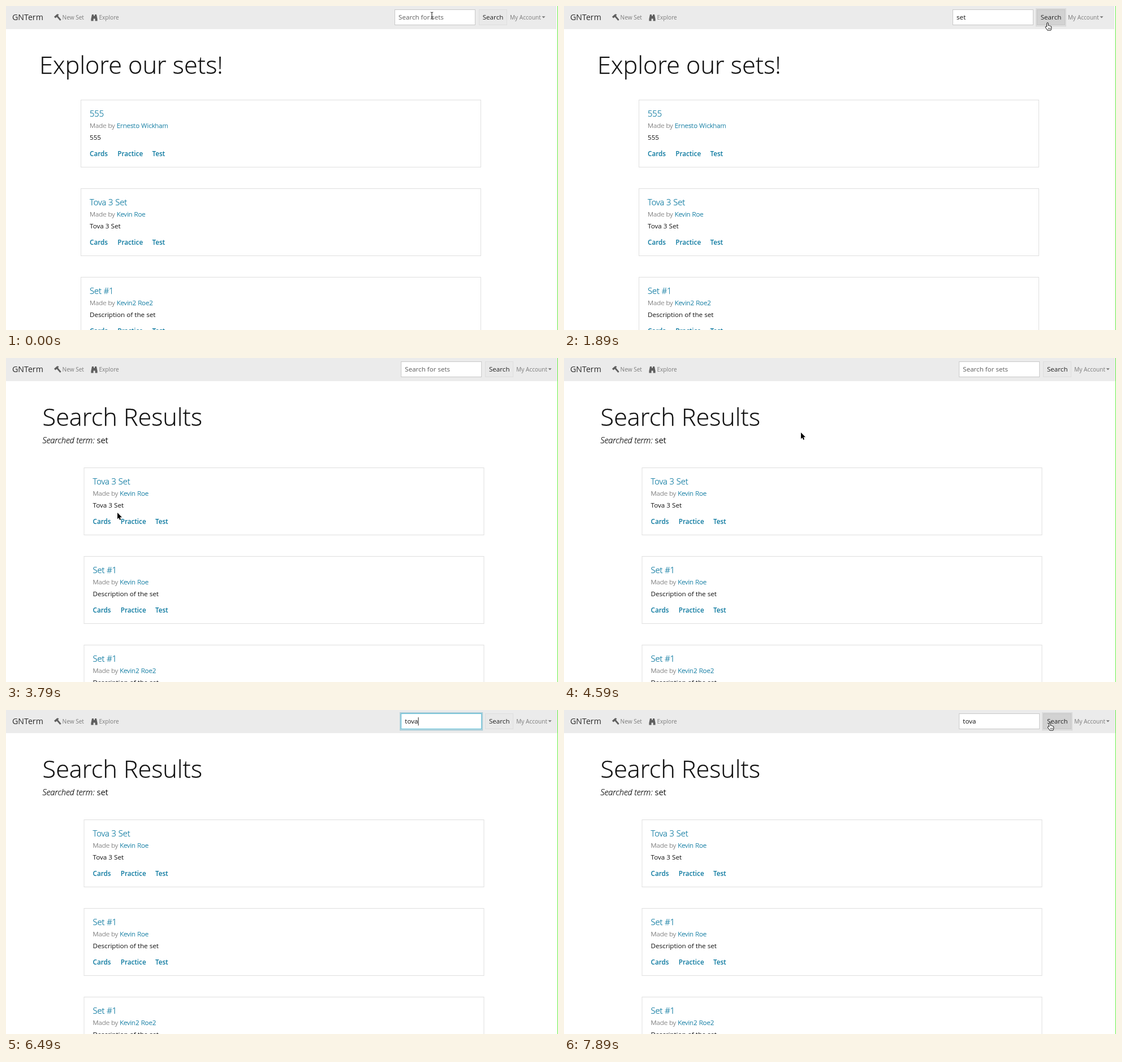
Animation of 976x574 px, one loop 7990 ms. Source, as an HTML page:

```html
<!DOCTYPE html>
<html lang="en">
<head>
<meta charset="utf-8">
<title>Set search</title>
<style>
html, body { margin: 0; width: 100%; height: 100%; overflow: hidden; background: #fff; }
svg { display: block; font-family: "Open Sans", "Noto Sans", sans-serif; cursor: default; }
</style>
</head>
<body>
<svg id="stage" width="976" height="574" viewBox="0 0 976 574"></svg>
<script>
const LOOP = 7990, RESULTS = 2390;
const LINK = '#0a789f', INK = '#111', GREY = '#7c7c7c';
const stage = document.getElementById('stage');

const cards = {
  fives: ['555', 'Ernesto Wickham', '555'],
  tova: ['Tova 3 Set', 'Kevin Roe', 'Tova 3 Set'],
  first: ['Set #1', 'Kevin Roe', 'Description of the set'],
  second: ['Set #1', 'Kevin2 Roe2', 'Description of the set'],
};

// Pointer stops: time, x, y
const path = [
  [0, 753, 17], [990, 753, 17], [1390, 855, 30], [2690, 855, 30],
  [3490, 205, 262], [3790, 197, 274], [4090, 215, 262], [4290, 262, 180],
  [5090, 758, 28], [6690, 758, 28], [7290, 859, 23], [LOOP, 859, 23],
];

// Searches: word, key times, focus, pointer back, click
const searches = [
  { word: 'set', keys: [490, 690, 790], focus: 190, back: 890, click: 1690 },
  { word: 'tova', keys: [5990, 6190, 6290, 6490], focus: 5190, back: 6790, click: 7390 },
];

const text = (x, y, size, fill, str, weight = 400, more = '') =>
  `<text x="${x}" y="${y}" font-size="${size}" fill="${fill}" font-weight="${weight}" ${more}>${str}</text>`;
const rect = (x, y, w, h, fill, more = '') =>
  `<rect x="${x}" y="${y}" width="${w}" height="${h}" fill="${fill}" ${more}/>`;
const shape = (d, fill, more = '') => `<path d="${d}" fill="${fill}" ${more}/>`;
// A hairline outline gives light type a fuller stem
const bolder = (colour, width = .25) => `stroke="${colour}" stroke-width="${width}"`;

function card([title, author, about], x, y) {
  const tx = x + 15.5;
  return rect(x, y, 707, 119, '#fff', 'stroke="#dfdfdf"') +
    text(tx, y + 29.8, 14.6, LINK, title, 300, bolder(LINK)) +
    text(tx, y + 49, 11.66, '#666',
      `Made by <tspan fill="${LINK}" ${bolder(LINK)}>${author}</tspan>`, 300, bolder('#666', .15)) +
    text(tx, y + 70.5, 11.66, INK, about) +
    ['Cards', 'Practice', 'Test'].map((s, i) =>
      text(tx + [0, 49.3, 110.4][i], y + 99.6, 11.66, LINK, s, 550)).join('');
}

function nav(dx, value, focused, pressed) {
  const fx = 687.5 + dx, bx = 836.5 + dx;
  const ring = x => `stroke="${x}" stroke-width="2"`;
  return rect(0, 0, 976, 41, '#ebebeb') +
    text(11, 25.3, 14.2, '#2b2b2b', 'GNTerm') +
    shape('M85 19L90.5 14.2 93.5 15 92 17.5 97.6 24.2 95.6 26 89.8 19.4 87.2 21.6Z', '#5f5f5f') +
    text(99.6, 24, 10.1, GREY, 'New Set') +
    shape('M152 15h3v2.4h2V15h3l1.6 8v3.4h-4V22.5h-3V26.4H150.4V23Z', '#5f5f5f') +
    text(164.4, 24, 10.1, GREY, 'Explore') +
    (focused ? rect(fx - 1.5, 5, 145, 30.5, 'none', ring('#a9ccd8')) : '') +
    rect(fx, 6.5, 142, 27, '#fff', `stroke="${focused ? '#58bcd6' : '#c8c8c8'}"`) +
    text(fx + 6.6, 24.4, 11.6, value ? INK : '#5c5c5c', value || 'Search for sets', 400, 'id="field"') +
    (pressed ? rect(bx - 1.5, 5, 52, 30.5, 'none', ring('#dadada')) : '') +
    rect(bx, 6.5, 49, 27, pressed ? '#d2d2d2' : '#e9e9e9', `stroke="${pressed ? '#c6c6c6' : '#dedede'}"`) +
    text(bx + 6.2, 24.4, 11.66, '#222', 'Search') +
    text(891 + dx, 24, 10.1, GREY, 'My Account') +
    shape(`M${947.5 + dx} 18.3h6l-3 3.2z`, '#777');
}

function pointerAt(t) {
  const i = path.findIndex(p => p[0] > t);
  const [t0, x0, y0] = path[i - 1], [t1, x1, y1] = path[i];
  const u = (t - t0) / (t1 - t0), k = u * u * (3 - 2 * u);
  return [x0 + (x1 - x0) * k, y0 + (y1 - y0) * k];
}

function pointer(t, dx) {
  const [x, y] = pointerAt(t);
  const over = (a, b) => y > 6 && y < 35 && x > a + dx && x < b + dx;
  let art;
  if (over(687, 830)) {
    art = shape('M-2.2-6Q-.4-6 0-5 .4-6 2.2-6M0-5V5M-2.2 6Q-.4 6 0 5 .4 6 2.2 6M-1.2 2.5H1.2', 'none', 'stroke="#111"');
  } else if (over(836, 887)) {
    art = shape('M-1.3 7V.8Q-1.3-.4 0-.4T1.3.8V4.6Q2.7 4 3.3 5.1 4.7 4.6 5.2 5.8 6.8 5.6 6.8 7.2V9.3Q6.8 10.6 5.8 13H-.2Q-1.5 10.8-3.6 8.2-4.2 6.5-2.6 5.8L-1.3 7Z',
      '#fff', 'stroke="#111" stroke-linejoin="round"') +
      shape('M1.3 8.6V11M3 8.6V11M4.7 8.6V11', 'none', 'stroke="#111" stroke-width=".7"');
  } else {
    art = shape('M0 0V11.3L2.5 9 4.2 13 6.1 12.2 4.4 8.3H8Z', '#000',
      'stroke="#fff" stroke-width=".9" paint-order="stroke"');
  }
  return `<g transform="translate(${x} ${y})">${art}</g>`;
}

function draw(t) {
  const results = t >= RESULTS, dx = results ? 11.2 : 0;
  const s = searches[+results];
  const value = s.word.slice(0, s.keys.filter(k => t >= k).length);
  const focused = t >= s.focus && t < s.click;
  const hidden = t >= s.keys[0] && t < s.back;
  const list = results ? ['tova', 'first', 'second'] : ['fives', 'tova', 'second'];
  const left = results ? 138 : 132.5, top = results ? 194.5 : 166.5;

  stage.innerHTML = rect(0, 0, 976, 574, '#fff') +
    nav(dx, value, focused, t >= s.click) +
    text(results ? 64.6 : 59.1, 120.2, 43.2, INK,
      results ? 'Search Results' : 'Explore our sets!', 300, bolder(INK, .3)) +
    (results ? text(64.4, 151.2, 14.6, INK,
      `<tspan font-style="italic" font-weight="300" ${bolder(INK)}>Searched term:</tspan> set`) : '') +
    list.map((key, i) => card(cards[key], left, top + 157 * i)).join('') +
    (results ? '' : rect(973, 0, 2, 574, '#fafafa')) +
    rect(975, 0, 1, 574, '#66ee44');

  const lastKey = Math.max(s.focus, ...s.keys.filter(k => t >= k));
  if (focused && (t - lastKey) % 1060 < 530) {
    const width = value ? document.getElementById('field').getComputedTextLength() : 0;
    stage.innerHTML += rect(694.3 + dx + width, 13, 1, 14.5, '#222');
  }
  if (!hidden) stage.innerHTML += pointer(t, dx);
}

let shown = null;
function tick(now) {
  // The picture advances every 100 ms, starting 90 ms in
  const t = Math.max(0, Math.floor((now % LOOP + 10) / 100) * 100 - 10);
  if (t !== shown) draw(shown = t);
  requestAnimationFrame(tick);
}
tick(performance.now());
</script>
</body>
</html>
```
